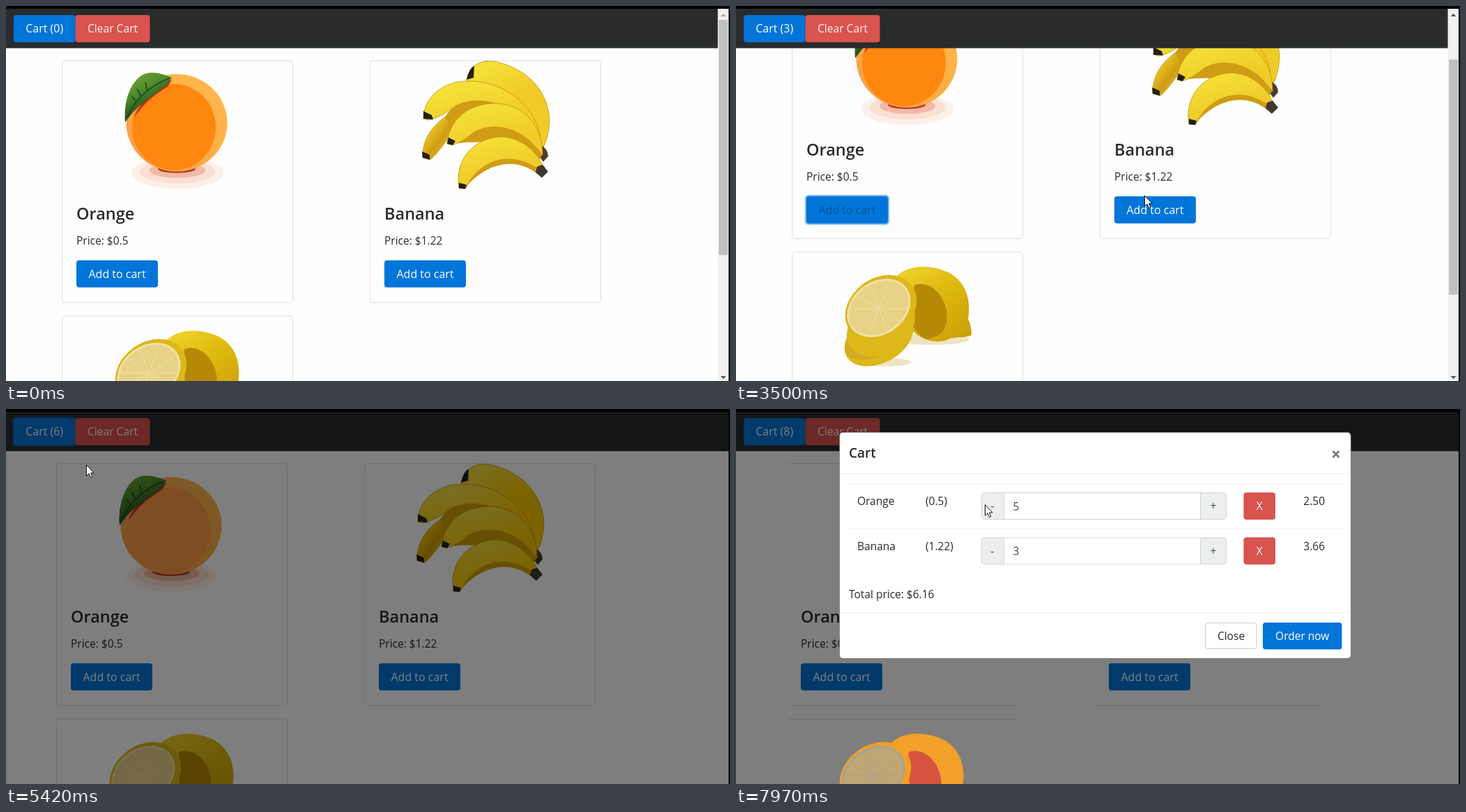
These frames come from a looping animation (1039 by 539 pixels, 8000 ms). An HTML page with a canvas:

```html
<!DOCTYPE html>
<html lang="en">
<head>
<meta charset="utf-8">
<title>Fruit cart</title>
<style>
html, body { margin: 0; width: 100%; height: 100%; overflow: hidden; background: #000; }
canvas { display: block; }
</style>
</head>
<body>
<canvas id="stage" width="1039" height="539"></canvas>
<script>
const ctx = document.getElementById('stage').getContext('2d');
const LOOP = 8000;
const BLUE = '#0275d8', HOVER = '#025aa5', RED = '#d9534f', INK = '#292b2c';

// [time, x, y] of the pointer tip
const track = [
  [200, 190, 545], [800, 175, 327], [880, 175, 327], [1040, 177, 301], [1600, 177, 301],
  [1620, 176, 299], [2900, 176, 299], [3500, 586, 272], [3570, 590, 292], [4420, 590, 292],
  [4640, 177, 164], [4900, 58, 38], [5240, 58, 38], [5300, 68, 55], [5740, 319, 192],
  [6080, 200, 180], [6400, 180, 150], [6550, 185, 104], [6910, 638, 135], [7000, 682, 138],
  [7600, 682, 138], [7720, 638, 137], [7930, 357, 137], [8000, 357, 137]
];
const clicks = [1000, 2050, 2830, 3700, 3950, 4200, 7100, 7450];
const OPEN = 5250;

const clamp = v => Math.max(0, Math.min(1, v));
const ramp = (t, a, b) => clamp((t - a) / (b - a));
const smooth = v => v * v * (3 - 2 * v);

function pointer(t) {
  if (t < track[0][0]) return null;
  const i = track.findIndex(k => k[0] > t);
  const [t0, x0, y0] = track[i - 1], [t1, x1, y1] = track[i];
  const k = smooth(ramp(t, t0, t1));
  return { x: x0 + (x1 - x0) * k, y: y0 + (y1 - y0) * k };
}

function scrollAt(t) {
  return Math.round(92 * (smooth(ramp(t, 330, 580)) - smooth(ramp(t, 4515, 4765))));
}

function text(s, x, y, size = 15.5, color = INK, align = 'left', weight = 400) {
  ctx.font = `${weight} ${size}px "Open Sans", "Noto Sans", sans-serif`;
  ctx.fillStyle = color;
  ctx.textAlign = align;
  ctx.fillText(s, x, y);
}

function rect(x, y, w, h, color) {
  ctx.fillStyle = color;
  ctx.fillRect(x, y, w, h);
}

function box(x, y, w, h, r, fill, stroke) {
  ctx.beginPath();
  ctx.roundRect(x, y, w, h, r);
  if (fill) { ctx.fillStyle = fill; ctx.fill(); }
  if (stroke) { ctx.strokeStyle = stroke; ctx.lineWidth = 1; ctx.stroke(); }
}

function shape(d, fill) {
  ctx.fillStyle = fill;
  ctx.fill(new Path2D(d));
}

function line(d, color, width) {
  ctx.strokeStyle = color;
  ctx.lineWidth = width;
  ctx.stroke(new Path2D(d));
}

function oval(x, y, rx, ry, fill, turn = 0) {
  ctx.beginPath();
  ctx.ellipse(x, y, rx, ry, turn, 0, 7);
  ctx.fillStyle = fill;
  ctx.fill();
}

function shade(x0, y0, x1, y1, ...colors) {
  const g = ctx.createLinearGradient(x0, y0, x1, y1);
  colors.forEach((c, i) => g.addColorStop(i / (colors.length - 1), c));
  return g;
}

function button(label, x, y, w, h, fill, size = 15.8, color = '#fff', ring) {
  if (ring) box(x - 2, y - 2, w + 4, h + 4, 5, ring);
  box(x, y, w, h, 4, fill);
  text(label, x + w / 2, y + h / 2 + 5.7, size, color, 'center');
}

function orange(core) {
  oval(246, 240, 66, 23, '#fdf0e8');
  oval(246, 238, 54, 17, '#fadfd2');
  oval(246, 236, 40, 11, '#f2b9a4');
  oval(245, 234, 27, 6, '#b8341c');
  oval(245, 168, 72.5, 70, shade(300, 105, 195, 215, '#ffb84f', '#ffae42', '#f9a04a'));
  oval(241, 174, 60, 62, core);
  shape('M184 160C190 140 215 118 238 106L232 116C212 128 198 140 184 160Z', '#c3301f');
  shape('M171 167C169 140 176 113 194 100C207 92 224 97 238 103C230 121 198 132 178 158Z',
    shade(185, 105, 205, 140, '#6d9c35', '#4a8a2b', '#2d5a20'));
  line('M174 160C184 136 205 115 234 104M187 138L180 129M194 130L188 119M203 122L200 110', '#24461c', 1.6);
}

function banana(light, base, dark) {
  const tip = '#222018', edge = '#c4930f';
  const peel = (y0, y1) => shade(680, y0, 695, y1, light, base);
  const fruit = (d, fill) => { shape(d, fill); line(d, edge, .8); };
  fruit('M661 106C667 82 684 77 703 80C752 91 779 126 780 165Q779 190 770 205L750 196C745 160 715 125 661 108Z',
    shade(700, 80, 755, 180, light, base, base));
  shape('M661 106Q664 90 672 86L671 103Z', tip);
  fruit('M598 218C597 194 610 173 632 158L658 164C638 180 629 203 609 221Z',
    shade(605, 175, 645, 205, base, dark, base));
  shape('M598 218L597 209L608 214L608 221Z', tip);
  shape('M630 160C650 125 710 120 758 185L735 200L650 190Z', dark);
  fruit('M599 162C599 130 630 107 663 108C720 107 763 150 767 190C742 151 690 123 646 143Q625 160 607 164Z', peel(110, 165));
  shape('M599 162L599 151L611 157L613 163Z', tip);
  shape('M640 198C670 165 735 165 762 215L715 195L660 196Z', dark);
  shape('M768 200Q778 206 778 216L771 224L764 214Z', '#4a3b2c');
  fruit('M633 198C636 162 665 139 705 140C748 143 771 177 770 215C742 176 704 166 672 181Q655 196 640 200Z', peel(142, 200));
  shape('M680 177C710 166 748 180 769 214L766 221C744 190 716 183 680 187Z', dark);
  shape('M633 198L635 189L645 194L641 200Z', tip);
  fruit('M650 262C643 220 672 189 712 188C742 190 762 210 772 233L764 240C737 212 683 216 660 262Z', peel(190, 245));
  shape('M660 260C681 219 728 205 768 237L762 241C730 216 690 226 660 260Z', dark);
  shape('M762 231L770 228L778 238L769 247L760 239Z', '#40382f');
  shape('M650 262L650 254L661 257L659 263Z', tip);
}

function lemon(c) {
  ctx.save();
  ctx.beginPath();
  ctx.rect(154, 460, 184, 155);
  ctx.clip();
  if (c.shadow) {
    oval(280, 571, 55, 8, c.shadow);
    oval(212, 604, 40, 6, c.shadow);
  }
  shape('M230 481C246 463 280 463 305 475C330 488 338 515 333 542Q338 551 338 565C325 571 316 565 300 573C270 580 246 557 234 535Z', c.body);
  shape('M256 493C276 486 297 503 302 530C305 555 296 567 274 571C257 564 246 545 253 520Z', c.core);
  oval(205, 570, 53, 35, c.rim, -0.5);
  oval(198, 572, 44, 24, c.under, -0.45);
  oval(208, 552, 53, 39, c.rim, -0.6);
  oval(208, 526, 55, 43, c.rim, -0.62);
  oval(205, 526, 49, 38, c.pith, -0.62);
  oval(205, 526, 46, 35, c.flesh, -0.62);
  for (let i = 0; i < 10; i++) {
    const a = i * Math.PI / 5;
    line(`M205 527L${205 + 41 * Math.cos(a)} ${527 + 34 * Math.sin(a)}`, c.pith, 1);
  }
  ctx.restore();
}

const natural = () => ({
  shadow: '#eee3c4', body: shade(245, 465, 325, 570, '#efd22c', '#dcb70c', '#cba00a'),
  core: '#b58806', rim: '#dcb818', under: '#d0ab22', pith: '#efe0a4', flesh: '#e8d288'
});
const dusk = { body: '#f2a02a', core: '#d5533f', rim: '#f0a026', under: '#d9982f', pith: '#a5a298', flesh: '#bfa672' };

function card(x, y, name, price, state, flat) {
  if (flat) {
    rect(x + 3, y, 327, 1, '#dedede');
    rect(x + 3, y + 348, 327, 1, '#dedede');
  } else {
    box(x + .5, y + .5, 331, 348, 4, '#fefefe', '#dfdfdf');
  }
  text(name, x + 21, y + 229, 23.5, INK, 'left', 600);
  text(price, x + 21, y + 264.5);
  const { hover, ring, faded } = state;
  button('Add to cart', x + 21, y + 287.5, 117, 39, hover ? HOVER : BLUE, 16,
    faded ? '#0256a0' : '#fff', ring && '#7fb9eb');
}

function page(t, count, p) {
  const open = t >= OPEN, flat = t >= 5440, sc = scrollAt(t);
  const width = open ? 1037 : 1022;
  rect(0, 4, 1037, 535, '#fefefe');
  ctx.save();
  ctx.translate(open ? -8 : 0, -sc);
  const over = x => !open && p && p.x > x && p.x < x + 117 && p.y + sc > 366 && p.y + sc < 404;
  const hot1 = over(101), hot2 = over(543);
  const own1 = t > 1300 && t < 3700, own2 = t >= 3700 && t < 5235;
  card(80, 78, 'Orange', 'Price: $0.5', { hover: hot1, ring: own1, faded: own1 && !hot1 }, flat);
  card(522, 78, 'Banana', 'Price: $1.22', { hover: hot2, ring: own2, faded: own2 && !hot2 }, flat);
  card(80, 445, 'Lemon', 'Price: $5', {}, flat);
  if (!flat) {
    orange(open ? '#ff9b47' : '#ff870f');
    if (open) banana('#f2dc40', '#fcc800', '#cf9f08');
    else banana('#f5e039', '#f0cb28', '#cf9c14');
    lemon(natural());
  }
  ctx.restore();

  rect(0, 4, width, 56.6, INK);
  const onCart = t < 5450 && p && p.x > 11 && p.x < 99 && p.y > 13 && p.y < (open ? 60 : 52);
  const ring = t > 5235 && t < 5850;
  button(`Cart (${count})`, 11, 13, 88.5, 39.3, onCart ? HOVER : BLUE, 16, '#fff', ring && '#14507f');
  button('Clear Cart', 99.5, 13, 107, 39.3, t > 5235 && t < 5400 ? '#c9302c' : RED, 15.6, '#fff6ec');

  if (!open) scrollbar(sc);
  const dim = .5 * ramp(t, OPEN, OPEN + 150);
  if (dim) rect(0, 4, 1037, 535, `rgba(0,0,0,${dim})`);
  if (flat) {
    ctx.save();
    ctx.translate(-8, 0);
    lemon(dusk);
    ctx.restore();
  }
}

function scrollbar(sc) {
  rect(1021.5, 4, 15.5, 535, '#f1f1f1');
  rect(1023, Math.round(20 + sc * .62), 13, 338, '#c1c1c1');
  shape('M1025.5 15L1029.5 11L1033.5 15Z', sc > 0 ? '#505050' : '#b5a98c');
  shape('M1025.5 532L1029.5 536L1033.5 532Z', '#505050');
}

function row(y, name, price, qty) {
  rect(162, y, 708, 1, '#eceeef');
  text(name, 174, y + 31);
  text(`(${price})`, 272, y + 31);
  box(352.5, y + 13.5, 351, 38, 4, '#eceeef', '#d2d3d4');
  rect(385, y + 14, 281, 37, '#fff');
  rect(384, y + 14, 1, 37, '#d2d3d4');
  rect(666, y + 14, 1, 37, '#d2d3d4');
  text('-', 368, y + 38, 15.5, '#464a4c', 'center');
  text('+', 685, y + 38, 15.5, '#464a4c', 'center');
  text(qty, 397.5, y + 38.5, 15.5, '#464a4c');
  button('X', 728.5, y + 13, 45.5, 39, RED);
  text((price * qty).toFixed(2), 845, y + 31, 15.5, INK, 'right');
}

function modal(t, count) {
  const k = ramp(t, 5450, 5750);
  if (!k) return;
  const qty = count - 3;
  ctx.save();
  ctx.globalAlpha = ramp(t, 5450, 5600);
  ctx.translate(0, Math.round(-82 * Math.pow(1 - k, 1.7)));
  box(148.5, 33.5, 734, 325, 5, '#fff', 'rgba(0,0,0,.3)');
  text('Cart', 162, 69.5, 19, INK, 'left', 600);
  line('M856.5 60.5L865.5 69.5M865.5 60.5L856.5 69.5', '#777', 2.6);
  rect(149, 92, 733, 1, '#eceeef');
  row(107, 'Orange', 0.5, qty);
  row(171.5, 'Banana', 1.22, 3);
  text(`Total price: $${(qty * .5 + 3.66).toFixed(2)}`, 162, 272);
  rect(149, 292, 733, 1, '#eceeef');
  box(673.5, 307.5, 74, 37, 4, '#fff', '#ccc');
  text('Close', 710.5, 332, 15.5, INK, 'center');
  button('Order now', 756, 307, 113.5, 38.5, BLUE, 15.5);
  ctx.restore();
}

function cursor(t, p) {
  if (!p) return;
  const inside = (x, y, w, h) => p.x > x && p.x < x + w && p.y > y && p.y < y + h;
  const add = 366 - scrollAt(t);
  const hand = t < OPEN && (inside(101, add, 117, 38) || inside(543, add, 117, 38) || inside(11, 13, 195, 39));
  ctx.save();
  ctx.translate(Math.round(p.x) + .5, Math.round(p.y) + .5);
  const d = hand
    ? 'M-3 1Q-1 -2 1 1V6Q3 5 4 7Q6 6 7 8Q9 7 10 10V15L7 21H-2L-7 13Q-9 10 -7 9L-3 12Z'
    : 'M0 0V15.5L3.6 12.2L6 18L8.4 17L6 11.4H10.6Z';
  shape(d, '#fff');
  line(d, '#111', 1);
  if (hand) line('M1 6V10M4 7V10M7 8V11', '#111', 1);
  ctx.restore();
}

function draw(t) {
  const count = clicks.filter(c => t >= c).length;
  const p = pointer(t);
  rect(0, 0, 1039, 539, '#000');
  page(t, count, p);
  modal(t, count);
  cursor(t, p);
  rect(0, 0, 1039, 4, '#000');
  rect(1037, 0, 2, 539, '#000');
}

const start = performance.now();
function tick() {
  draw((performance.now() - start) % LOOP);
  requestAnimationFrame(tick);
}
tick();
</script>
</body>
</html>
```
